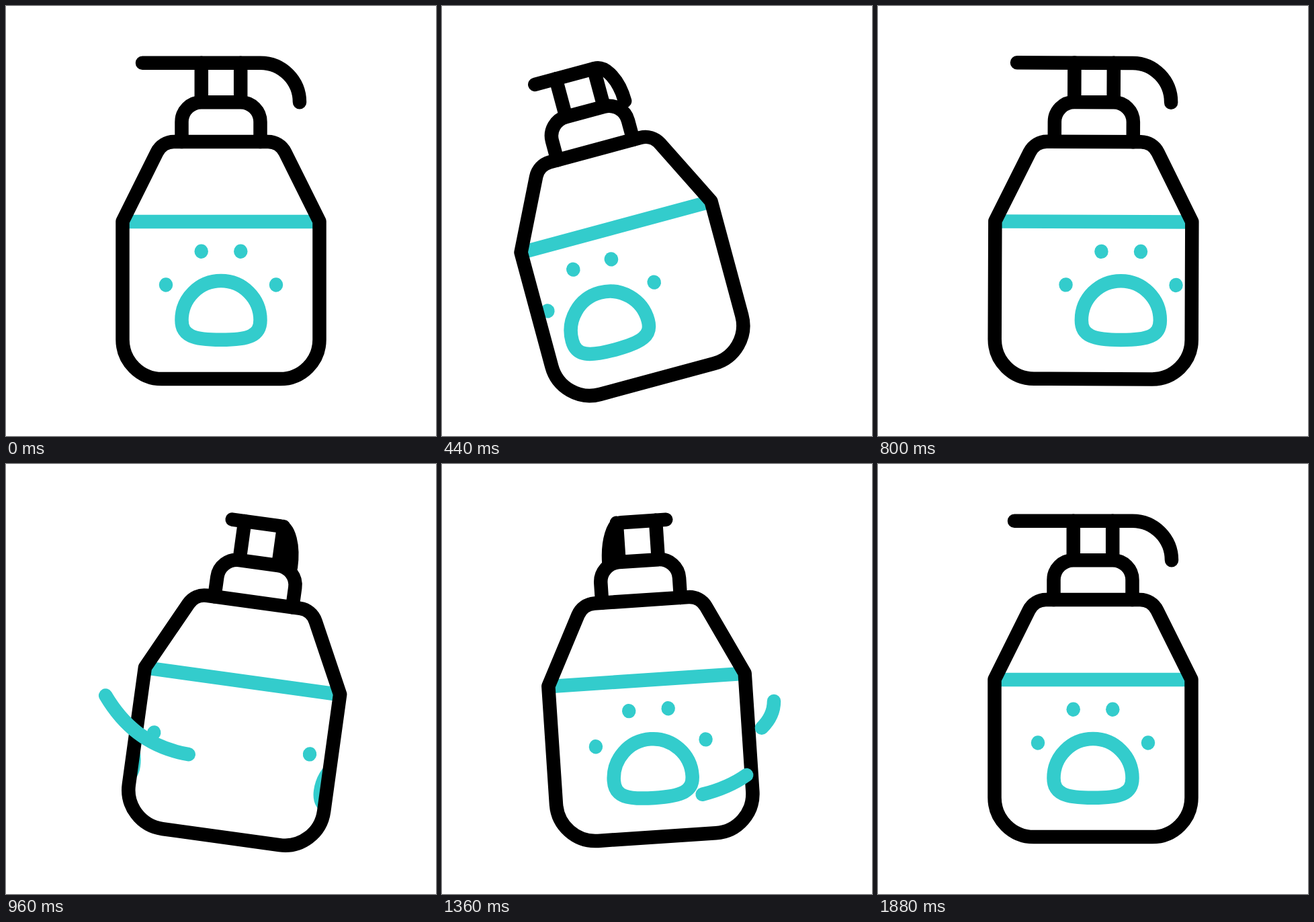
Animation, 640 px wide and 640 px high, one loop 2400 ms. Source, as an HTML page:

```html
<!DOCTYPE html>
<html lang="en">
<head>
<meta charset="utf-8">
<title>Pump bottle</title>
<style>
  html, body { margin: 0; width: 100%; height: 100%; overflow: hidden; background: #fff; }
  svg { display: block; width: 100vw; height: 100vh; }
  .line { fill: none; stroke: #000; stroke-width: 20.5; stroke-linecap: round; stroke-linejoin: round; }
  .teal { stroke: #3cc; }
  .dot { fill: #3cc; }
</style>
</head>
<body>
<svg viewBox="0 0 640 640">
  <defs>
    <path id="body" d="M173.5 320.5L224.5 218C229.5 208 239.5 202 250 202H390C400.500 202 410.500 208 415.500 218L466.500 320.500V496.500A58.600 58.600 0 0 1 407.900 555.100H232.100A58.600 58.600 0 0 1 173.500 496.500Z"/>
    <clipPath id="inside"><use href="#body"/></clipPath>
    <g id="paw">
      <g class="dot">
        <ellipse cx="290.7" cy="365.300" rx="10.250" ry="10.700"/>
        <ellipse cx="349.300" cy="365.300" rx="10.250" ry="10.700"/>
        <ellipse cx="238" cy="415" rx="10.250" ry="10.700"/>
        <ellipse cx="402" cy="415" rx="10.250" ry="10.700"/>
      </g>
      <path class="line teal" d="M261.500 467.500A58.500 58.500 0 0 1 378.500 467.500C378.500 491 361 496.800 320 496.800C279 496.800 261.500 491 261.500 467.500Z"/>
    </g>
  </defs>
  <g id="bottle">
    <g clip-path="url(#inside)">
      <path class="line teal" d="M173.500 321H466.500"/>
      <use id="pawA" href="#paw"/>
      <use id="pawB" href="#paw"/>
    </g>
    <use href="#body" class="line"/>
    <path class="line" d="M261.500 202V172.500A29.300 29.300 0 0 1 290.800 143.200H349.200A29.300 29.300 0 0 1 378.500 172.500V202M290.800 143V84.700M349.200 143V84.700"/>
    <path class="line" id="spout"/>
    <path class="line teal" id="swooshA" pathLength="1" d="M121 370C152 409 194 439 259 440C350 449 424 447 479 409C498 396 506 380 507 365"/>
    <path class="line teal" id="swooshB" pathLength="1" d="M181 472C222 497 270 502 320 502C370 502 420 496 459 472"/>
  </g>
</svg>
<script>
  const LOOP = 2400;
  const WRAP = 398;
  const $ = id => document.getElementById(id);

  // Each track lists [time in ms, value]
  const tilt = [[0, 0], [595, -18.1], [920, 8.2], [1330, -4], [1610, 2], [1880, 0]];
  const slide = [[0, 0], [597, -58.6], [1273, WRAP]];
  const turn = [[0, 1], [563, .46], [832, 1], [1191, -1], [1650, 1]];
  const swooshes = [
    { el: $("swooshA"), head: [[800, 0], [1200, 1]], tail: [[1040, 0], [1440, 1]] },
    { el: $("swooshB"), head: [[960, 0], [1280, 1]], tail: [[1095, 0], [1490, 1]] }
  ];

  const ease = s => s * s * (3 - 2 * s);

  function at(track, t) {
    if (t <= track[0][0]) return track[0][1];
    for (let i = 1; i < track.length; i++) {
      const [t0, a] = track[i - 1], [t1, b] = track[i];
      if (t < t1) return a + (b - a) * ease((t - t0) / (t1 - t0));
    }
    return track[track.length - 1][1];
  }

  // Only the points are squeezed, so the line keeps its weight
  function spoutPath(k) {
    const x = d => (320 + d * k).toFixed(2);
    return `M${x(-117)} 84.7H${x(58.6)}C${x(91)} 84.7 ${x(117)} 111 ${x(117)} 143.3`;
  }

  function trim({ el, head, tail }, t) {
    const from = at(tail, t), to = at(head, t);
    const shown = to - from > .001;
    el.style.display = shown ? "" : "none";
    if (!shown) return;
    el.setAttribute("stroke-dasharray", `${to - from} 3`);
    el.setAttribute("stroke-dashoffset", -from);
  }

  function draw(t) {
    const x = at(slide, t);
    $("bottle").setAttribute("transform", `rotate(${at(tilt, t)} 320 555)`);
    $("pawA").setAttribute("x", x);
    $("pawB").setAttribute("x", x - WRAP);
    $("spout").setAttribute("d", spoutPath(at(turn, t)));
    swooshes.forEach(s => trim(s, t));
  }

  const start = performance.now();
  function tick(now) {
    draw(Math.max(0, now - start) % LOOP);
    requestAnimationFrame(tick);
  }
  draw(0);
  requestAnimationFrame(tick);
</script>
</body>
</html>
```
